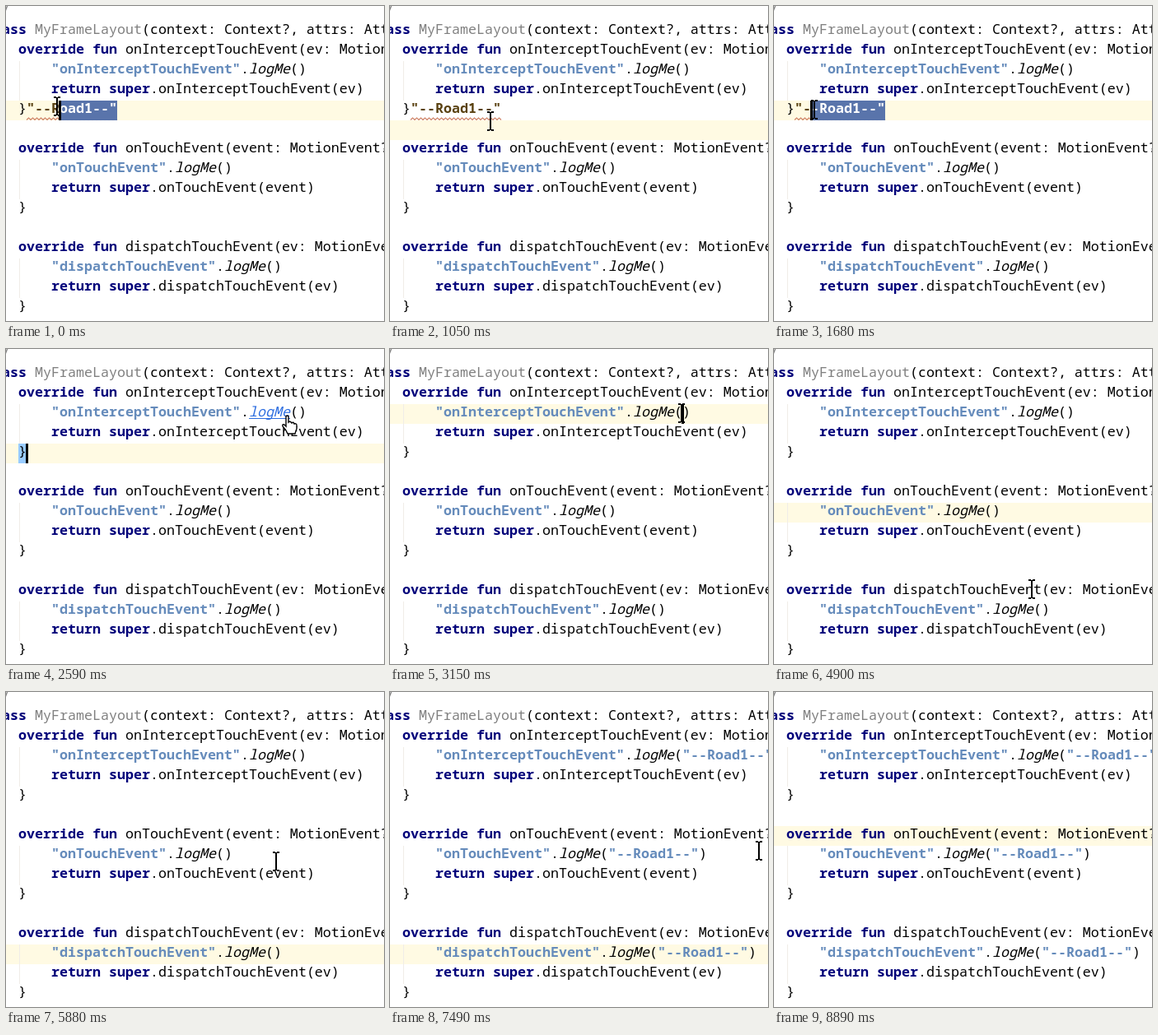
These frames come from a looping animation (459x383 px, 9.31 s). An HTML page with a canvas:

```html
<!DOCTYPE html>
<html lang="en">
<head>
<meta charset="utf-8">
<title>Multi-caret paste</title>
<style>
  html, body { margin: 0; width: 100%; height: 100%; overflow: hidden; background: #fff; }
  canvas { display: block; }
</style>
</head>
<body>
<canvas id="stage" width="459" height="383"></canvas>
<script>
const ctx = document.getElementById('stage').getContext('2d');
const WIDTH = 459, HEIGHT = 383, LOOP = 9310, STEP = 70;
const COL = 10, ROW = 24, LEFT = -25, TOP = -5, BASELINE = 15;
const FONT = '16.667px "Noto Sans Mono", "DejaVu Sans Mono", monospace';
const METHOD_ROW = 2, METHOD_ROWS = 5;
const SNIPPET = '"--Road1--"';
const SNIPPET_ROW = 5, SNIPPET_X = 25, SNIPPET_END = SNIPPET_X + SNIPPET.length * COL;

const STYLES = {
  plain: ['', '#000'],
  keyword: ['bold ', '#00007a'],
  string: ['bold ', '#658bbb'],
  call: ['italic ', '#000'],
  link: ['italic ', '#2f6fe0'],
  muted: ['', '#808080'],
  stray: ['bold ', '#5a4212'],
  selected: ['bold ', '#fff']
};

// Editing steps, in ms
const CLICK_BLANK = 1050, DRAG_AGAIN = 1330, DRAG_END = 1820, CUT = 2310,
      LINK_ON = 2520, LINK_OFF = 2730, FIRST_CARET = 3150, CARET_GAP = 1120,
      PASTE = 6090, KEYS_UP = 6650, CLICK_AWAY = 8120;
const BLINK_ON = 490, BLINK_OFF = 420;

const methods = [['onInterceptTouchEvent', 'ev'], ['onTouchEvent', 'event'], ['dispatchTouchEvent', 'ev']];

// Pointer glides: start, end, x, y
const glides = [
  [0, 210, 28, 126],
  [770, CLICK_BLANK, 122, 140],
  [1120, DRAG_AGAIN, 136, 126],
  [DRAG_AGAIN, DRAG_END, 27, 126],
  [2170, 2590, 341, 81],
  [2590, LINK_OFF, 354, 78],
  [3220, 3850, 262, 193],
  [4200, 5180, 325, 317],
  [5460, 5880, 328, 206],
  [6230, 7140, 449, 370],
  [7140, 7490, 448, 193],
  [7560, 7840, 464, 180]
];

const rowTop = row => TOP + row * ROW;
const within = (t, from, to) => t >= from && t < to;
const clamp = (value, low, high) => Math.max(low, Math.min(high, value));

function pointerAt(t) {
  let x = 62, y = 122;
  for (const [start, end, toX, toY] of glides) {
    const p = clamp((t - start) / (end - start), 0, 1);
    const eased = p * p * (3 - 2 * p);
    x += (toX - x) * eased;
    y += (toY - y) * eased;
  }
  return [Math.round(x), Math.round(y)];
}

const caretCount = t => clamp(Math.floor((t - FIRST_CARET) / CARET_GAP) + 1, 0, methods.length);

function activeRow(t) {
  if (t >= CLICK_AWAY) return METHOD_ROW + METHOD_ROWS;
  if (t >= FIRST_CARET) return METHOD_ROW + 1 + METHOD_ROWS * (caretCount(t) - 1);
  return SNIPPET_ROW + within(t, CLICK_BLANK, DRAG_AGAIN);
}

function caretVisible(t) {
  const lastClick = FIRST_CARET + CARET_GAP * (caretCount(t) - 1);
  const lastEdit = t >= KEYS_UP ? KEYS_UP : t >= PASTE ? PASTE : lastClick;
  return (t - lastEdit) % (BLINK_ON + BLINK_OFF) < BLINK_ON || within(t, PASTE, KEYS_UP);
}

function fill(color, x, y, w, h) {
  ctx.fillStyle = color;
  ctx.fillRect(x, y, w, h);
}

// Draws [text, style] pairs one after another and returns the end x
function write(row, column, ...tokens) {
  let x = LEFT + column * COL;
  for (const [text, style = 'plain'] of tokens) {
    const [face, color] = STYLES[style];
    ctx.font = face + FONT;
    ctx.fillStyle = color;
    ctx.fillText(text, x, rowTop(row) + BASELINE);
    if (style === 'link') fill(color, x, rowTop(row) + BASELINE + 2, text.length * COL, 1);
    x += text.length * COL;
  }
  return x;
}

const drawCaret = (row, x) => fill('#000', x - 1, rowTop(row), 3, ROW);

function drawMethod([name, arg], index, t) {
  const row = METHOD_ROW + METHOD_ROWS * index;
  fill('#f0ece8', 16, rowTop(row + 1), 1, 2 * ROW);
  write(row, 4, ['override fun ', 'keyword'], [`${name}(${arg}: MotionEvent?): Boolean {`]);
  const linked = index === 0 && within(t, LINK_ON, LINK_OFF);
  const pasted = t >= PASTE ? SNIPPET : '';
  const end = write(row + 1, 8, [`"${name}"`, 'string'], ['.'], ['logMe', linked ? 'link' : 'call'],
                    ['('], [pasted, 'string'], [')']);
  write(row + 2, 8, ['return super', 'keyword'], [`.${name}(${arg})`]);
  write(row + 3, 4, ['}']);
  if (index < caretCount(t) && t < CLICK_AWAY && caretVisible(t)) drawCaret(row + 1, end - COL);
}

function drawSnippet(t) {
  const top = rowTop(SNIPPET_ROW);
  if (t < CUT) {
    write(SNIPPET_ROW, 5, [SNIPPET, 'stray']);
    ctx.strokeStyle = '#cf8468';
    ctx.lineWidth = 1.2;
    ctx.beginPath();
    for (let x = SNIPPET_X, i = 0; x <= SNIPPET_END; x += 2.5, i++) ctx.lineTo(x, top + (i % 2 ? 21 : 23.5));
    ctx.stroke();
  }
  if (within(t, CLICK_BLANK, DRAG_AGAIN) || t >= FIRST_CARET) return;

  let caretX = SNIPPET_X;
  if (t < CUT) {
    const [x] = pointerAt(Math.min(t, t < CLICK_BLANK ? 420 : DRAG_END));
    const hidden = clamp(Math.round((x - SNIPPET_X) / COL), 0, SNIPPET.length);
    caretX += hidden * COL;
    fill('#5974ab', caretX, top, SNIPPET_END - caretX, ROW);
    write(SNIPPET_ROW, 5 + hidden, [SNIPPET.slice(hidden), 'selected']);
  }
  drawCaret(SNIPPET_ROW, caretX);
}

const hand = new Path2D('M-1 1Q.5-1 2 1V8Q4 6 6 9Q8 7 9 10Q12 9 12 12V16Q11 18 10 22H1Q-1 17-5 13Q-6 10-3 11L-1 13Z');

function drawPointer(t) {
  ctx.save();
  ctx.translate(...pointerAt(t));
  if (within(t, LINK_ON, LINK_OFF)) {
    ctx.fillStyle = '#fff';
    ctx.strokeStyle = '#000';
    ctx.lineWidth = 1.4;
    ctx.fill(hand);
    ctx.stroke(hand);
  } else {
    fill('#000', -1, -11, 2, 22);
    for (const capY of [-12, 10]) {
      fill('#000', -4, capY, 3, 2);
      fill('#000', 1, capY, 3, 2);
    }
  }
  ctx.restore();
}

function draw(t) {
  fill('#fff', 0, 0, WIDTH, HEIGHT);
  fill('#fffae3', 0, rowTop(activeRow(t)), WIDTH, ROW);
  if (within(t, CUT, FIRST_CARET)) fill('#99ccff', 15, rowTop(SNIPPET_ROW), COL, ROW);

  write(0, 1, ['*/', 'muted']);
  write(1, 0, ['class ', 'keyword'], ['MyFrameLayout', 'muted'], ['(context: Context?, attrs: AttributeSet?)']);
  methods.forEach((method, index) => drawMethod(method, index, t));
  drawSnippet(t);
  drawPointer(t);
}

function tick(now) {
  draw(Math.floor((now % LOOP) / STEP) * STEP);
  requestAnimationFrame(tick);
}
requestAnimationFrame(tick);
</script>
</body>
</html>
```
